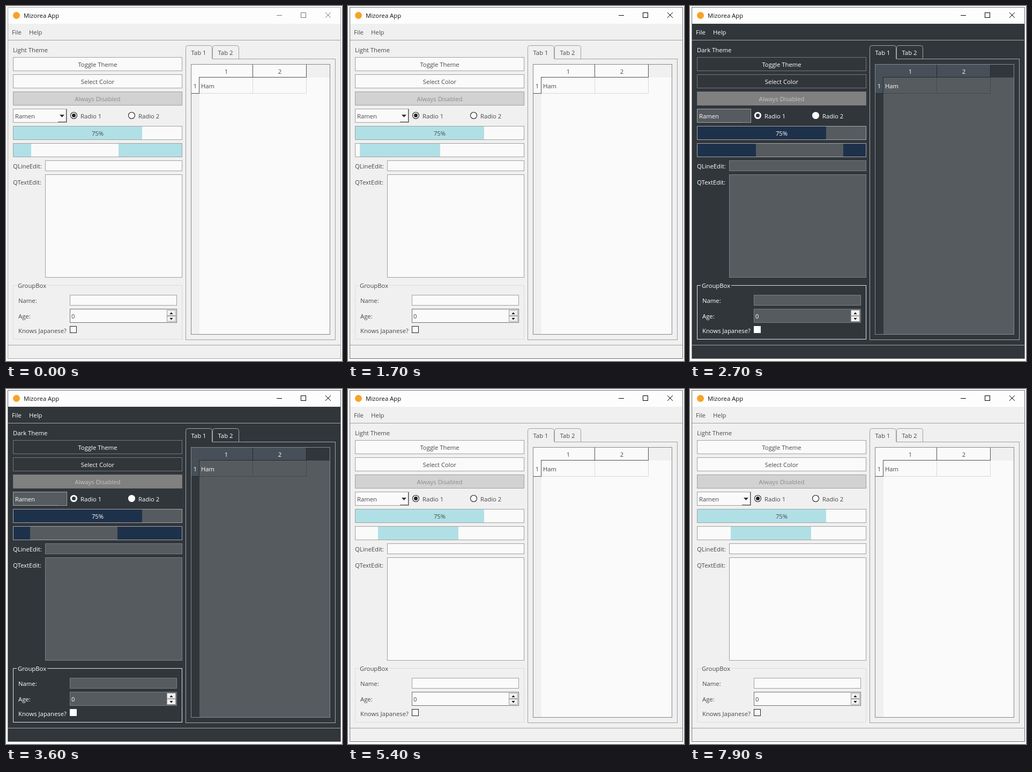
Write an HTML page that moves like this. It is 627 px wide and 660 px high and loops after 8 s.

```html
<!DOCTYPE html>
<html lang="en">
<head>
<meta charset="utf-8">
<title>Theme demo</title>
<style>
html, body { margin: 0; width: 100%; height: 100%; overflow: hidden; background: #fcfcfc; }
#app {
  display: block; width: 627px; height: 660px;
  --bg: #f0f0f0; --base: #fafafa; --button: #fafafa; --text: #484848;
  --line: #a0a0a0; --edge: #a0a0a0; --field: #a0a0a0; --group: #dcdcdc;
  --off: #d2d2d2; --off-text: #8c8c8c; --chunk: #b0e0e6;
  --head: #fafafa; --head-edge: #505050; --grid: #d8d8d8; --table: #828790;
  --spin: #707070; --mark: #fafafa; --mark-edge: #222; --dot: #222;
  --drop: #fafafa; --drop-edge: #505050; --arrow: #333;
  --frame: #a9a9a9; --icons: #777;
}
#app.dark {
  --bg: #31363b; --base: #565b5f; --button: #31363b; --text: #fff;
  --line: #a4a7a9; --edge: #76797c; --field: #7b7f82; --group: #e4e5e6;
  --off: #808080; --off-text: #c4c4c4; --chunk: #1e314b;
  --head: #474f58; --head-edge: #24292d; --grid: #44494d; --table: #858a92;
  --spin: #7b7f82; --mark: #fff; --mark-edge: #fff; --dot: #31363b;
  --drop: #565b5f; --drop-edge: #454a4e; --arrow: #565b5f;
}
#app.active { --frame: #707070; --icons: #000; }
text { font: 11.3px "Open Sans", "Noto Sans", sans-serif; fill: var(--text); }
rect, path { shape-rendering: crispEdges; fill: none; }
.mid { text-anchor: middle; }
.bg { fill: var(--bg); }
.base { fill: var(--base); }
.line { stroke: var(--line); }
.button { fill: var(--button); stroke: var(--edge); }
.off { fill: var(--off); stroke: var(--edge); }
.off-text { fill: var(--off-text); }
.field { fill: var(--base); stroke: var(--field); }
.bar { fill: var(--base); stroke: var(--line); }
.chunk { fill: var(--chunk); }
.group { stroke: var(--group); }
.head { fill: var(--head); }
.head-edge { stroke: var(--head-edge); }
.grid { stroke: var(--grid); }
.mark { fill: var(--mark); stroke: var(--mark-edge); }
.smooth { shape-rendering: auto; }
</style>
</head>
<body>
<svg id="app" viewBox="0 0 627 660">
  <!-- window and title bar -->
  <rect x="3" y="2" width="622" height="31" style="fill:#fdfdfd"/>
  <rect class="bg" x="4" y="33" width="620" height="622"/>
  <rect x="3.5" y="2.5" width="621" height="653" style="stroke:var(--frame)"/>
  <circle cx="19.5" cy="17.5" r="6.5" fill="#f7a325"/>
  <text x="33" y="22" style="fill:#111">Mizorea App</text>
  <g style="stroke:var(--icons)">
    <path d="M505 17.5h10M550.5 12.5h9v9h-9z"/>
    <path class="smooth" d="M596 12l10 10m0-10l-10 10"/>
  </g>
  <path class="line" d="M4 63.5H624M4 630.5H624"/>
  <text x="11" y="53">File</text>
  <text x="43" y="53">Help</text>

  <!-- buttons -->
  <text id="theme" x="13" y="86">Light Theme</text>
  <rect class="button" x="13.5" y="95.5" width="315" height="25"/>
  <text class="mid" x="171" y="113">Toggle Theme</text>
  <rect class="button" x="13.5" y="127.5" width="315" height="25"/>
  <text class="mid" x="171" y="145">Select Color</text>
  <rect class="off" x="13.5" y="159.5" width="315" height="25"/>
  <text class="mid off-text" x="171" y="177">Always Disabled</text>

  <!-- combo box and radios -->
  <rect class="bar" x="13.5" y="191.5" width="100" height="25"/>
  <text x="17" y="209">Ramen</text>
  <rect x="97" y="192" width="16" height="24" style="fill:var(--drop)"/>
  <path d="M97 215.5H112.5V192" style="stroke:var(--drop-edge)"/>
  <path class="smooth" d="M100 202h9l-4.500 5z" style="fill:var(--arrow)"/>
  <circle class="mark" cx="126.500" cy="203.500" r="6" stroke-width="1.1"/>
  <circle cx="126.500" cy="203.500" r="3.500" style="fill:var(--dot)"/>
  <text x="139" y="209">Radio 1</text>
  <circle class="mark" cx="234.500" cy="203.500" r="6" stroke-width="1.1"/>
  <text x="247" y="209">Radio 2</text>

  <!-- progress bars -->
  <rect class="bar" x="13.5" y="223.5" width="315" height="25"/>
  <rect class="chunk" x="14" y="224" width="240" height="24"/>
  <text class="mid" x="171" y="241">75%</text>
  <rect class="bar" x="13.5" y="255.5" width="315" height="25"/>
  <svg x="14" y="256" width="314" height="24">
    <g id="busy">
      <rect class="chunk" width="150" height="24"/>
      <rect class="chunk" x="-313" width="150" height="24"/>
    </g>
  </svg>

  <!-- text inputs -->
  <text x="13" y="302">QLineEdit:</text>
  <rect class="field" x="73.5" y="287.5" width="255" height="19"/>
  <text x="13" y="332">QTextEdit:</text>
  <rect class="field" x="73.5" y="313.5" width="255" height="191"/>

  <!-- group box -->
  <path class="group" d="M20 519.5H13.5V619.5H328.5V519.5H77"/>
  <text x="22" y="524">GroupBox</text>
  <text x="23" y="552">Name:</text>
  <rect class="field" x="119.5" y="537.5" width="199" height="19"/>
  <text x="23" y="581">Age:</text>
  <rect class="base" x="119.5" y="563.5" width="199" height="25" style="stroke:var(--spin)"/>
  <text x="122" y="581">0</text>
  <path d="M300.5 565.5h16v10h-16zM300.5 576.5h16v10h-16z" style="fill:#f0f0f0;stroke:#a0a0a0"/>
  <path class="smooth" d="M305.500 573h6l-3-3.500zM305.500 580h6l-3 3.500z" style="fill:#000"/>
  <text x="23" y="608">Knows Japanese?</text>
  <rect class="mark" x="119.5" y="595.5" width="12" height="12"/>

  <!-- tabs -->
  <path class="line smooth" d="M335.5 98V77.500q0-4 4-4h41q4 0 4 4V98m1 0V77.500q0-4 4-4h41q4 0 4 4V98"/>
  <path class="line" d="M385 98.5H614.5V620.5H335.5V98"/>
  <text class="mid" x="359.5" y="91">Tab 1</text>
  <text class="mid" x="409.5" y="91">Tab 2</text>

  <!-- table -->
  <rect class="base" x="345.5" y="108.5" width="259" height="502" style="stroke:var(--table)"/>
  <path class="bg" d="M561 109h43v24h-43zM346 163h15v447h-15z"/>
  <path class="head" d="M346 109h215v24H361v30h-15z"/>
  <path class="grid" d="M361 162.5H560.5V133M460.5 133V162"/>
  <path class="head-edge" d="M360 132.5H560.5V109M460.5 109V132M346 162.5H360.5V132"/>
  <text class="mid" x="411" y="126">1</text>
  <text class="mid" x="511" y="126">2</text>
  <text class="mid" x="353" y="153">1</text>
  <text x="364" y="153">Ham</text>
</svg>
<script>
const byId = id => document.getElementById(id);
const app = byId("app"), theme = byId("theme"), busy = byId("busy");
const STEP = 100, STEPS = 80, SPAN = 313, LEFT = 14;

// [step, distance travelled]: nearly steady, with slight timer drift
const path = [[0, 210], [17, 648], [27, 912], [45, 1382], [54, 1621], [63, 1853], [79, 2267]];

function distance(step) {
  const i = path.findIndex(([s]) => s >= step) || 1;
  const [s0, d0] = path[i - 1], [s1, d1] = path[i];
  return Math.round(d0 + (d1 - d0) * (step - s0) / (s1 - s0));
}

function draw() {
  const step = Math.floor(performance.now() / STEP) % STEPS;
  const dark = step >= 18 && step < 50;
  app.classList.toggle("dark", dark);
  app.classList.toggle("active", step >= 17);
  theme.textContent = dark ? "Dark Theme" : "Light Theme";
  busy.setAttribute("transform", `translate(${(distance(step) - LEFT) % SPAN} 0)`);
  requestAnimationFrame(draw);
}
draw();
</script>
</body>
</html>
```
